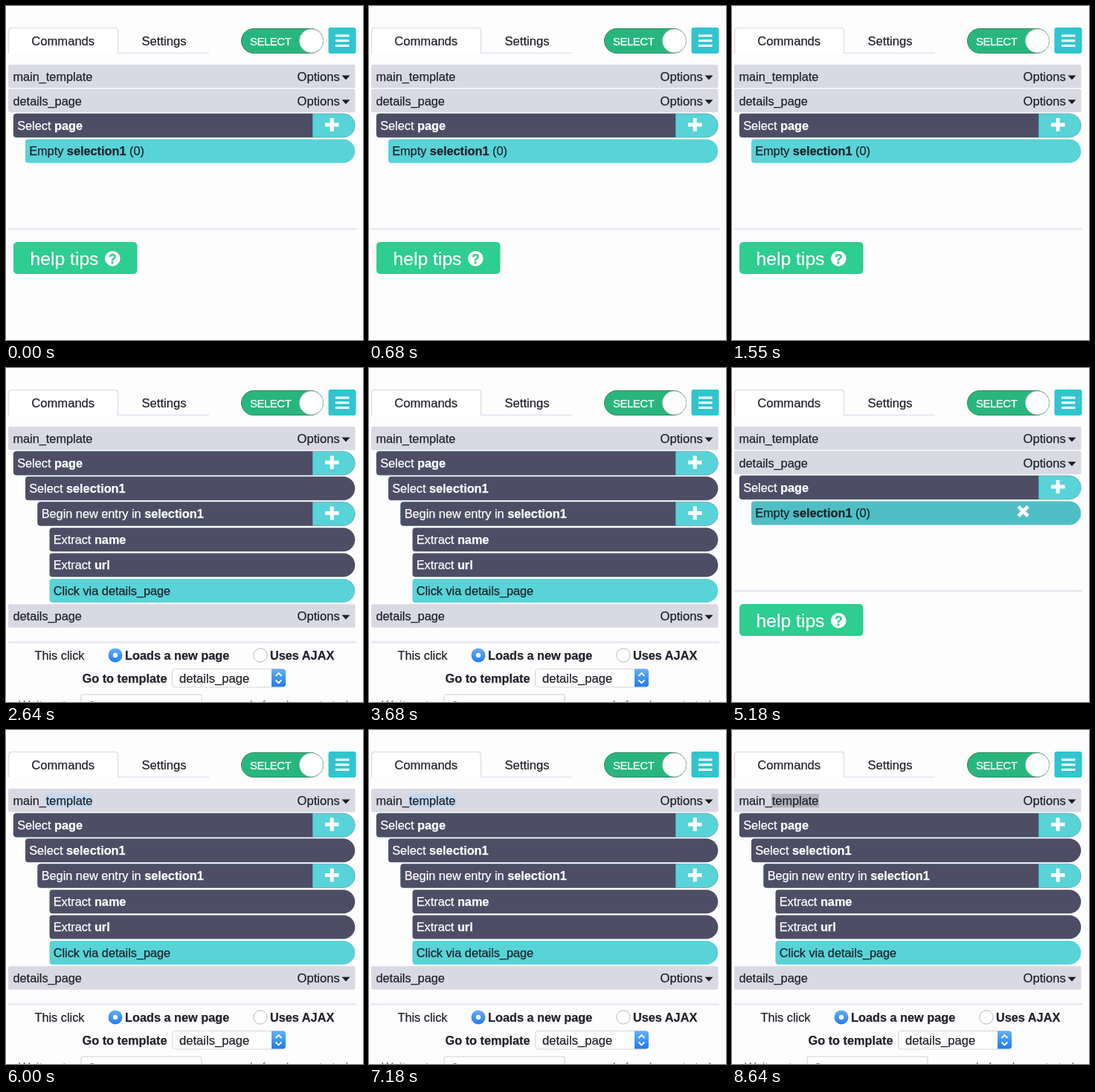
These frames come from a looping animation (480x450 px, 8690 ms). An HTML page:

```html
<!DOCTYPE html>
<html lang="en">
<head>
<meta charset="utf-8">
<title>Command panel</title>
<style>
  html, body { margin: 0; width: 100%; height: 100%; overflow: hidden; background: #fefdfe; }
  svg { display: block; width: 480px; height: 450px; }
  text {
    font: 16.3px "Liberation Sans", Arial, sans-serif; white-space: pre;
    fill: #22222a; stroke: #22222a; stroke-width: .25px;
  }
  .b { font-weight: bold; }
  .light { fill: #fff; stroke: #fff; }
  .wide { font-size: 16.6px; }
  .faint { fill: #77777c; stroke: none; }
</style>
</head>
<body>
<svg id="stage" viewBox="0 0 480 450"></svg>
<script>
const LOOP = 8690;
const TEAL = '#58d3d8', DARK = '#4d4e65', GREEN = '#2ecd90', LINE = '#dfe2ec';
const ROW = 32;

const text = (x, y, s, cls = '') => `<text x="${x}" y="${y}" class="${cls}">${s}</text>`;
const bold = s => `<tspan class="b">${s}</tspan>`;
const rect = (x, y, w, h, r, fill, more = '') =>
  `<rect x="${x}" y="${y}" width="${w}" height="${h}" rx="${r}" fill="${fill}" ${more}/>`;
const path = (d, more) => `<path d="${d}" ${more}/>`;
const group = (id, ...parts) => `<g id="${id}">${parts.join('')}</g>`;

// Pill that is nearly square on the left and round on the right.
const pill = (x, y, fill, more = '') => {
  const r = ROW / 2, l = 4;
  return path(`M${x + l} ${y}H${469.3 - r}a${r} ${r} 0 0 1 0 ${ROW}H${x + l}a${l} ${l} 0 0 1 ${-l} ${-l}v${2 * l - ROW}a${l} ${l} 0 0 1 ${l} ${-l}z`,
    `fill="${fill}" ${more}`);
};

const template = (y, name, under = '') =>
  rect(3, y, 466.5, 31.5, 2, '#d9d9e3') + under + text(9.5, y + 22, name) +
  text(391.5, y + 22, 'Options', 'wide') + path(`M451.5 ${y + 14.5}h11l-5.5 6z`, 'fill="#1d1d24"');

const command = (x, y, label, plus) => {
  let s;
  if (plus) {
    s = pill(x, y, TEAL, 'stroke="#5b8f9e" stroke-width=".6"') +
      path(`M${x + 4} ${y}H412.3v${ROW}H${x + 4}a4 4 0 0 1 -4 -4v${8 - ROW}a4 4 0 0 1 4 -4z`, `fill="${DARK}"`) +
      path(`M429 ${y + 15}h18.5M438.2 ${y + 6}v18`, 'stroke="#fff" stroke-width="5"');
  } else s = pill(x, y, DARK);
  return s + text(x + 5.2, y + 21.5, label, 'light');
};

const header =
  path('M150.5 63.5H273', `stroke="${LINE}" stroke-width="1.6"`) +
  path('M3.5 64V34q0-4.5 4.5-4.5H146q4.5 0 4.5 4.5V64', `fill="#fff" stroke="${LINE}" stroke-width="1.6"`) +
  text(34.3, 53, 'Commands', 'wide') + text(182.5, 53, 'Settings', 'wide') +
  rect(316.5, 30.5, 110, 33, 16.5, '#28b67d', 'stroke="#3b8468"') +
  `<text x="328" y="53" class="light" style="font-size:15px;letter-spacing:-.5px">SELECT</text>` +
  `<circle cx="410.5" cy="47" r="16" fill="#fff" stroke="#b9c4c0" stroke-width=".8"/>` +
  rect(433.5, 29, 37, 35, 3, '#30c5cd') +
  path('M443 40h18.5M443 46.7h18.5M443 53.4h18.5', 'stroke="#fff" stroke-width="3"');

const divider = y => path(`M3 ${y}H471`, `stroke="${LINE}" stroke-width="1.8"`);

const help = group('help',
  rect(10, 318, 166.5, 43, 5, GREEN),
  `<text x="32.5" y="349" class="light" style="font-size:24.7px">help tips</text>`,
  `<circle cx="143.3" cy="340.3" r="10.3" fill="#fff"/>`,
  `<text x="143.3" y="346.5" text-anchor="middle" class="b" style="font-size:17.5px;fill:${GREEN};stroke:${GREEN}">?</text>`);

const detailsView = group('details',
  template(79, 'main_template'), template(111.7, 'details_page'),
  command(10, 145, 'Select ' + bold('page'), true),
  pill(26, 179.5, TEAL, 'id="emptyRow"'),
  text(31.2, 201, 'Empty ' + bold('selection1') + ' (0)'),
  path('M385 186.5l13 13M398 186.5l-13 13', 'id="remove" stroke="#fff" stroke-width="4.6"'),
  divider(300.3), help);

const radio = (x, on) => on
  ? `<circle cx="${x}" cy="387" r="9.5" fill="url(#blue)"/><circle cx="${x}" cy="387" r="3.2" fill="#fff"/>`
  : `<circle cx="${x}" cy="387" r="9.2" fill="#fff" stroke="#b8b8bc"/>`;

const mainView = group('main',
  template(79, 'main_template', rect(53, 86, 64, 18.5, 0, '#c3d9f0', 'id="marked"')),
  command(10, 112.2, 'Select ' + bold('page'), true),
  command(26, 146.3, 'Select ' + bold('selection1')),
  command(42.5, 180.5, 'Begin new entry in ' + bold('selection1'), true),
  command(58.5, 215.2, 'Extract ' + bold('name')),
  command(58.5, 249.5, 'Extract ' + bold('url')),
  pill(58.5, 284, TEAL), text(63.7, 305.5, 'Click via details_page'),
  template(318.2, 'details_page'), divider(369.5),
  text(38.5, 392.5, 'This click'),
  radio(147, true), text(160, 392.5, 'Loads a new page', 'b'),
  radio(342, false), text(355, 392.5, 'Uses AJAX', 'b'),
  text(102.5, 424, 'Go to template', 'b'),
  rect(223.5, 405.5, 152, 24.5, 4, '#fff', 'stroke="#d4d4d8"'),
  text(233, 424, 'details_page', 'wide'),
  path('M357 405.5h15q4 0 4 4v16q0 4-4 4h-15z', 'fill="url(#blue)"'),
  path('M362.5 415l4-4 4 4M362.5 420.5l4 4 4-4', 'fill="none" stroke="#fff" stroke-width="1.8"'),
  text(17, 459.5, 'Wait up to', 'faint'),
  rect(101, 440, 162, 26, 2, '#fff', 'stroke="#cfcfd5"'),
  text(111, 460.5, '2', 'faint'),
  text(279, 459.5, 'seconds for elements to load', 'faint'));

const defs = `<linearGradient id="blue" x2="0" y2="1">
  <stop stop-color="#64aff8"/><stop offset="1" stop-color="#1f7df0"/></linearGradient>`;

document.getElementById('stage').innerHTML =
  defs + rect(0, 0, 480, 450, 0, '#fefdfe') + header + detailsView + mainView;

const el = id => document.getElementById(id);
const show = (id, on) => el(id).setAttribute('display', on ? 'inline' : 'none');
const within = (t, a, b) => t >= a && t < b;

function draw(t) {
  const onMain = within(t, 2230, 4370) || t >= 5720;
  const hover = within(t, 5000, 5450);
  show('main', onMain);
  show('details', !onMain);
  show('help', !within(t, 4370, 4540));
  show('remove', hover);
  el('emptyRow').setAttribute('fill', hover ? '#4fbfc5' : TEAL);
  show('marked', t >= 5900);
  el('marked').setAttribute('fill', t < 7300 ? '#c3d9f0' : '#b3b3ba');
}

const start = performance.now();
function tick() {
  draw((performance.now() - start) % LOOP);
  requestAnimationFrame(tick);
}
tick();
</script>
</body>
</html>
```
